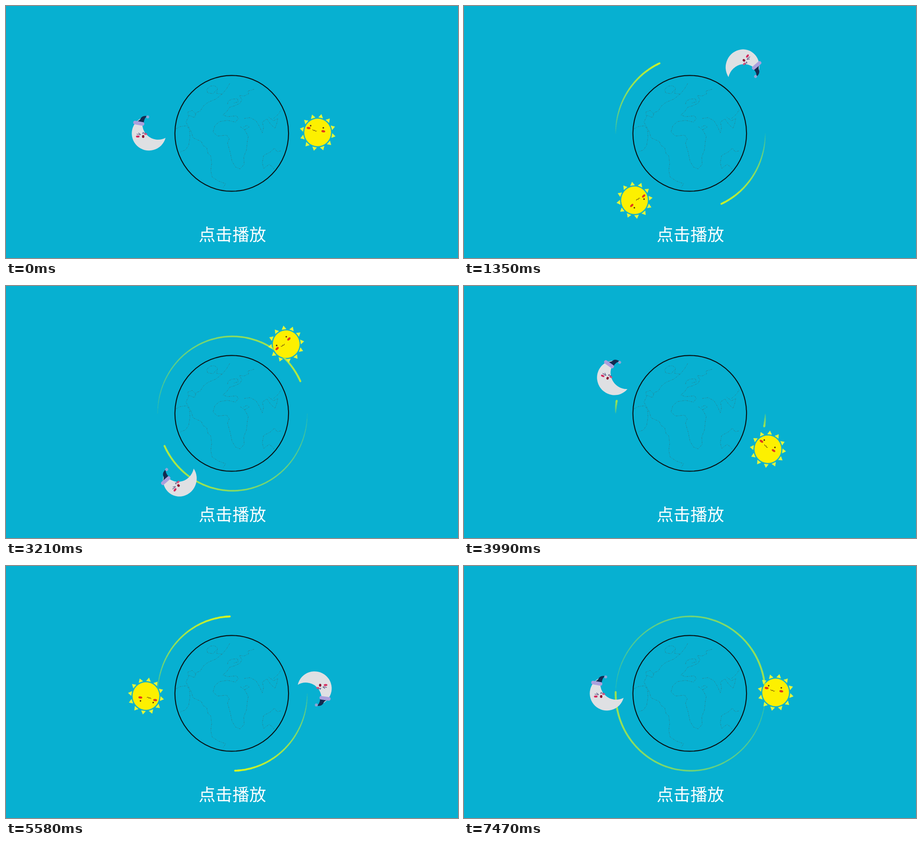
These frames come from a looping animation (1000 by 560 pixels, 7500 ms). An HTML page:

```html
<!DOCTYPE html>
<html lang="zh">
<head>
<meta charset="utf-8">
<title>点击播放</title>
<style>
  html, body { margin: 0; width: 100%; height: 100%; overflow: hidden; background: #07b0d1; }
  svg { display: block; width: 100%; height: 100%; }
  text { font: 400 37.3px "Noto Sans CJK SC", "Noto Sans CJK", sans-serif; fill: #fff; }
</style>
</head>
<body>
<svg viewBox="0 0 1000 560">
  <rect width="1000" height="560" fill="#07b0d1"/>

  <g id="lands" fill="none" stroke="#3a6a70" stroke-width=".9" stroke-dasharray="4 2 1.500 2" stroke-linejoin="round" opacity=".65"/>
  <ellipse cx="499.4" cy="283" rx="125.7" ry="128.7" fill="none" stroke="#081114" stroke-width="2.2"/>

  <g id="trail" fill="none"/>
  <use href="#trail" transform="rotate(180 501 283.5)"/>

  <g id="orbit">
    <g transform="scale(1 .967) translate(-499.5 -281.3)">
      <g id="moon">
        <path d="M353 293A38 38 0 1 1 305 247A35 35 0 0 0 353 293Z" fill="#dfe0e3"/>
        <path d="M288 257Q296 255 299 248Q303 243 313 244.500Q306 248 304.500 260Z" fill="#122b50"/>
        <circle cx="313.500" cy="246.500" r="3.300" fill="#8fa6d6"/>
        <path d="M285.500 259L302 262" stroke="#aa9fdd" stroke-width="8" stroke-linecap="round"/>
        <ellipse cx="291.500" cy="290" rx="4" ry="2.300" fill="#d42a5e"/>
        <ellipse cx="309" cy="284.500" rx="3.400" ry="2" fill="#d4507e"/>
        <path d="M289 284.500L297 286.500M293 282L298 286M303 283L309 281.500M304 280L302 284" fill="none" stroke="#544a7c" stroke-width="1.200"/>
        <ellipse cx="303.500" cy="290" rx="2.600" ry="3.200" fill="#8c1030"/>
      </g>
      <g transform="translate(689.500 281) scale(1 1.034)">
        <g id="rays" fill="#e0f53c"/>
        <circle r="29.600" fill="#fdf000" stroke="#a4d848" stroke-width=".8"/>
        <g fill="#e23a1c">
          <ellipse cx="-20" cy="-9.500" rx="4.300" ry="2.400" transform="rotate(8 -20 -9.500)"/>
          <ellipse cx="12.500" cy="-2.500" rx="4.300" ry="2.400" transform="rotate(8 12.500 -2.500)"/>
        </g>
        <g fill="#56330c">
          <circle cx="-15.500" cy="-14.500" r="1.700"/>
          <circle cx="12.500" cy="-10" r="1.700"/>
        </g>
        <path d="M-11 -6.500q1.500 4 4.500 1.500q1.500 4 4.500 1.500" fill="none" stroke="#6b4a10" stroke-width="1.100"/>
      </g>
    </g>
  </g>

  <text x="426.300" y="521.700">点击播放</text>
</svg>
<script>
const LOOP = 7500, STEP = 30, SPIN = 720 / 7470;
const SEGMENTS = 40;
const SKY = [7, 176, 209], GLOW = [232, 252, 16];
const $ = id => document.getElementById(id);

function add(parent, attrs) {
  const el = document.createElementNS("http://www.w3.org/2000/svg", "path");
  for (const k in attrs) el.setAttribute(k, attrs[k]);
  return parent.appendChild(el);
}

// coastlines
[
  "M495 172L488 184L478 196L464 207L447 214L437 222L430 233L421 237L417 248L405 243",
  "M478 196L466 194L468 182L461 177L452 178L444 185L446 193L458 195L466 186",
  "M420 240L412 232L402 236L404 246L398 258L402 265L410 280L414 293L425 298L432 301L436 310L444 315L447 328L453 333L455 350L453 365L456 380L470 389L486 395L480 404",
  "M376 273L385 268L400 266L406 275L407 292L404 310L397 320L386 324",
  "M549 185L535 189L537 195L527 200L516 199L522 208L518 216L505 222L495 225L488 235L480 242L490 246L510 244L514 250L508 258L490 254L472 257L462 266L458 280L468 289L488 287L494 295L490 305L496 325L500 345L508 358L518 362L527 352L526 335L532 320L534 300L536 290L528 275L518 268",
  "M490 218L492 211L500 207L512 206L514 213L503 216",
  "M528 275L538 269L533 265L524 270",
  "M527 250L540 248L553 255L561 268L567 282L570 270L567 258L577 251L585 262L595 272L600 258L601 250L592 255L580 246",
  "M592 250L603 240L609 230",
  "M608 322L600 324L594 316L584 325L570 332L567 348L570 361L582 352L590 358L595 365"
].forEach(d => add($("lands"), { d }));

for (let i = 0; i < 12; i++)
  add($("rays"), { d: "M32 -5.300L40.300 0L32 5.300Z", transform: `rotate(${12 + 30 * i})` });

const segments = Array.from({ length: SEGMENTS }, () => add($("trail"), {}));

const point = deg => {
  const a = deg * Math.PI / 180;
  return (501 - 165.5 * Math.cos(a)).toFixed(2) + " " + (283.5 - 171.5 * Math.sin(a)).toFixed(2);
};
const mix = k => `rgb(${SKY.map((c, i) => Math.round(c + (GLOW[i] - c) * k))})`;

// sweep of each trail in degrees, two passes per loop
function sweep(t) {
  if (t < 15) return 0;
  if (t < 3740) return Math.min(181, 0.5 + t * 0.0482);
  return Math.max(0, (t - 3796) * 0.0493);
}

function drawTrail(len) {
  const head = 0.95 - 0.27 * Math.abs(len - 97) / 83;
  segments.forEach((seg, i) => {
    const s = (i + 0.5) / SEGMENTS;
    const from = len * i / SEGMENTS, to = Math.min(len, len * (i + 1) / SEGMENTS + 0.3);
    seg.setAttribute("d", len ? `M${point(from)}A165.5 171.5 0 0 1 ${point(to)}` : "");
    seg.setAttribute("stroke", mix(head * s ** 0.5));
    seg.setAttribute("stroke-width", 1.2 + 3 * s ** 0.5);
    seg.setAttribute("stroke-linecap", i === SEGMENTS - 1 ? "round" : "butt");
  });
}

function render(ms) {
  const t = Math.floor((ms % LOOP) / STEP + 0.01) * STEP;
  $("orbit").setAttribute("transform", `translate(499.5 281.3) scale(1 1.034) rotate(${t * SPIN})`);
  drawTrail(sweep(t));
}

const start = performance.now();
function tick() {
  render(performance.now() - start);
  requestAnimationFrame(tick);
}
tick();
</script>
</body>
</html>
```
